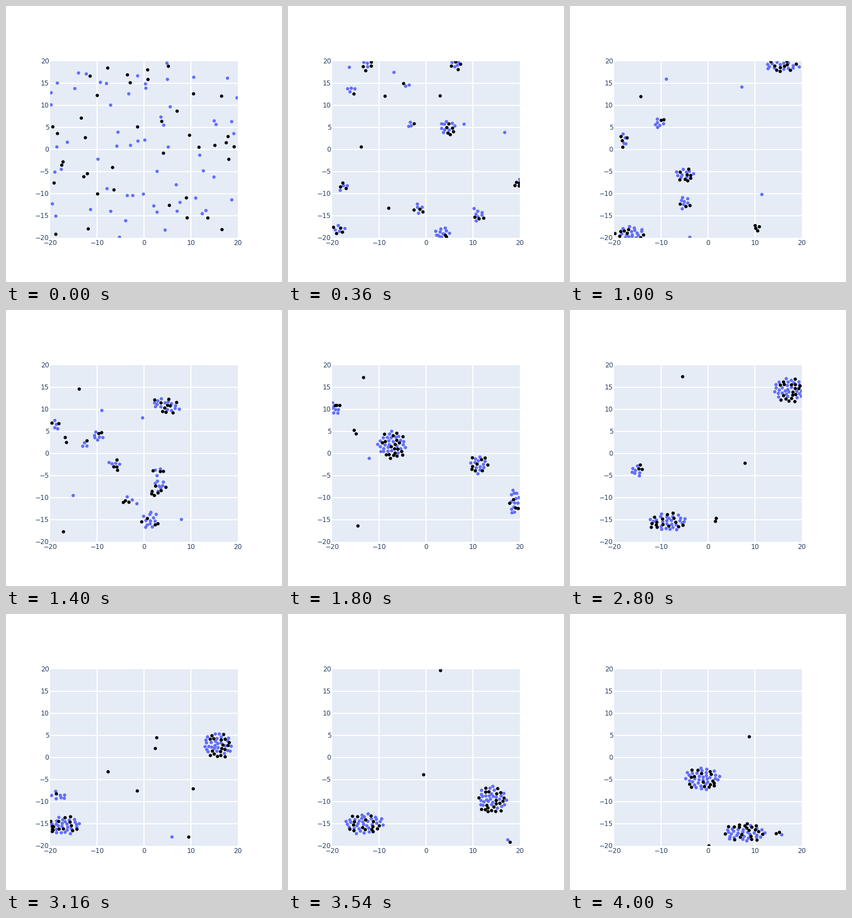
Write a matplotlib script that moves like this. It is 500 by 500 pixels and loops after 4020 ms.

```python
import numpy as np
import matplotlib.pyplot as plt
from matplotlib.animation import FuncAnimation

SIZE, DPI = 500, 100
FRAMES, INTERVAL = 201, 20
LIMIT = 20
N_BLUE, N_BLACK = 60, 40
N = N_BLUE + N_BLACK
SPACING = .45
GOLDEN = np.pi * (3 - 5 ** .5)
PX = 72 / DPI

rng = np.random.default_rng(7)

# Flocks at each meeting time: x, y, dots, index of parent flock, stretch.
# A centre beyond a wall means that the flock bounces off it.
STAGES = {
    18: [
        (-12.6, 19, 7), (-15.9, 13.5, 5), (-4.2, 14.5, 3), (-3.3, 5.7, 4),
        (4.7, 5, 15), (6.5, 19.2, 8), (-17.7, -8.5, 6), (-18.5, -18.2, 8),
        (-1.5, -13.6, 7), (3.5, -19.3, 14), (11.3, -15, 9), (19.7, -7.7, 5),
    ],
    50: [
        (15.8, 18.9, 24, 4, 1.8), (-17.9, 2, 8, 6, .6), (-10.4, 6, 8, 3),
        (-4.9, -5.8, 17, 1, 1.2), (-4.9, -12.1, 10, 10),
        (10.5, -17.5, 4, 11), (-16.5, -19, 24, 9, 1.5),
    ],
    90: [
        (-7.2, 1.9, 47, 0), (-19.4, 10.4, 10, 2), (11.2, -2.5, 21, 3),
        (18.8, -11.1, 17, 4, .6), (-15, 5, 2, 1),
        (-13.3, 17.2, 1), (-14.5, -16.4, 1), (-12.1, -1.1, 1),
    ],
    140: [
        (17.3, 14.4, 45, 0, 1.1), (-15, -3.8, 10, 1),
        (-8.5, -15.5, 41, 2, 1.45), (1.9, -14.9, 2, 4),
        (-5.4, 17.4, 1, 5), (7.9, -2.2, 1, 6),
    ],
    177: [
        (14.1, -9.6, 48, 0), (-26.8, -15, 48, 2, 1.35),
        (17.4, -21.2, 2, 3), (-.5, -3.9, 1, 4), (3.1, 19.7, 1, 5),
    ],
    200: [
        (-1.2, -4.8, 48, 1, 1.2), (7.8, -23, 47, 0, 1.5),
        (15.2, -22.8, 3, 2), (.2, -20, 1, 3), (8.8, 4.7, 1, 4),
    ],
}


def fold(v):
    """Reflect coordinates at the walls."""
    return np.abs((v - LIMIT) % (4 * LIMIT) - 2 * LIMIT) - LIMIT


def pack(n, stretch):
    """Evenly spaced dots in an ellipse around the origin."""
    if n == 1:
        return np.zeros((1, 2))
    i = np.arange(n)
    a = i * GOLDEN + rng.uniform(0, 2 * np.pi)
    spots = SPACING * np.sqrt(i + .5)[:, None] * np.c_[np.cos(a), np.sin(a)]
    return (spots + rng.uniform(-.15, .15, (n, 2))) * (stretch, 1 / stretch)


def arrange(flocks, parents):
    """Places for all dots, and where those places lay around the parents."""
    goal, origin = [], []
    for x, y, n, parent, stretch in flocks:
        spots = pack(n, stretch)
        goal.append(spots + (x, y))
        source = (x, y) if parent is None else parents[parent]
        origin.append(spots + source)
    loners = rng.uniform(-LIMIT, LIMIT, (N - sum(f[2] for f in flocks), 2))
    return np.vstack(goal + [loners]), np.vstack(origin + [loners])


def match(now, origin):
    """Pair each dot with a place by swapping until nothing improves."""
    cost = ((now[:, None] - origin) ** 2).sum(axis=2)
    idx = np.arange(N)
    pick = idx.copy()
    improved = True
    while improved:
        improved = False
        for i in idx:
            gain = (cost[i, pick[i]] + cost[idx, pick]
                    - cost[i, pick] - cost[idx, pick[i]])
            j = gain.argmax()
            if gain[j] > 1e-6:
                pick[[i, j]] = pick[[j, i]]
                improved = True
    return pick


def build_path():
    now, t0, parents = rng.uniform(-LIMIT, LIMIT, (N, 2)), 0, None
    path = [now[None]]
    for t1, rows in STAGES.items():
        flocks = [(*row, None, 1)[:5] if len(row) == 3 else (*row, 1)[:5]
                  for row in rows]
        goal, origin = arrange(flocks, parents)
        goal = goal[match(now, origin)]
        u = (np.arange(1, t1 - t0 + 1) / (t1 - t0))[:, None, None]
        path.append(fold(now + (goal - now) * u))
        now, t0 = path[-1][-1], t1
        parents = fold(np.array([f[:2] for f in flocks]))
    return np.concatenate(path)


path = build_path()

fig = plt.figure(figsize=(SIZE / DPI, SIZE / DPI), dpi=DPI, facecolor="white")
ax = fig.add_axes([80 / SIZE, 80 / SIZE, 340 / SIZE, 320 / SIZE],
                  facecolor="#E5ECF6")
ax.set(xlim=(-LIMIT, LIMIT), ylim=(-LIMIT, LIMIT), xticks=[], yticks=[])
ax.spines[:].set_visible(False)
for x in range(-10, 20, 10):
    ax.axvline(x, color="white", lw=2 * PX, zorder=0)
for y in range(-15, 20, 5):
    ax.axhline(y, color="white", lw=2 * PX, zorder=0)


def label(x, y, value, ha):
    fig.text(x / SIZE, 1 - y / SIZE, str(value).replace("-", "\u2212"),
             ha=ha, va="baseline", color="#2A3F5F",
             family="DejaVu Sans", size=12 * PX)


for v in range(-20, 21, 10):
    label(250 + v * 8.5, 433, v, "center")
for v in range(-20, 21, 5):
    label(78.2, 264 - v * 8, v, "right")

dots = ax.scatter(*path[0].T, s=(6 * PX) ** 2, linewidths=0, zorder=2,
                  c=["#636EFA"] * N_BLUE + ["black"] * N_BLACK)


def update(frame):
    dots.set_offsets(path[frame])
    return [dots]


anim = FuncAnimation(fig, update, frames=FRAMES, interval=INTERVAL,
                     repeat=True, repeat_delay=0)
plt.show()
```
